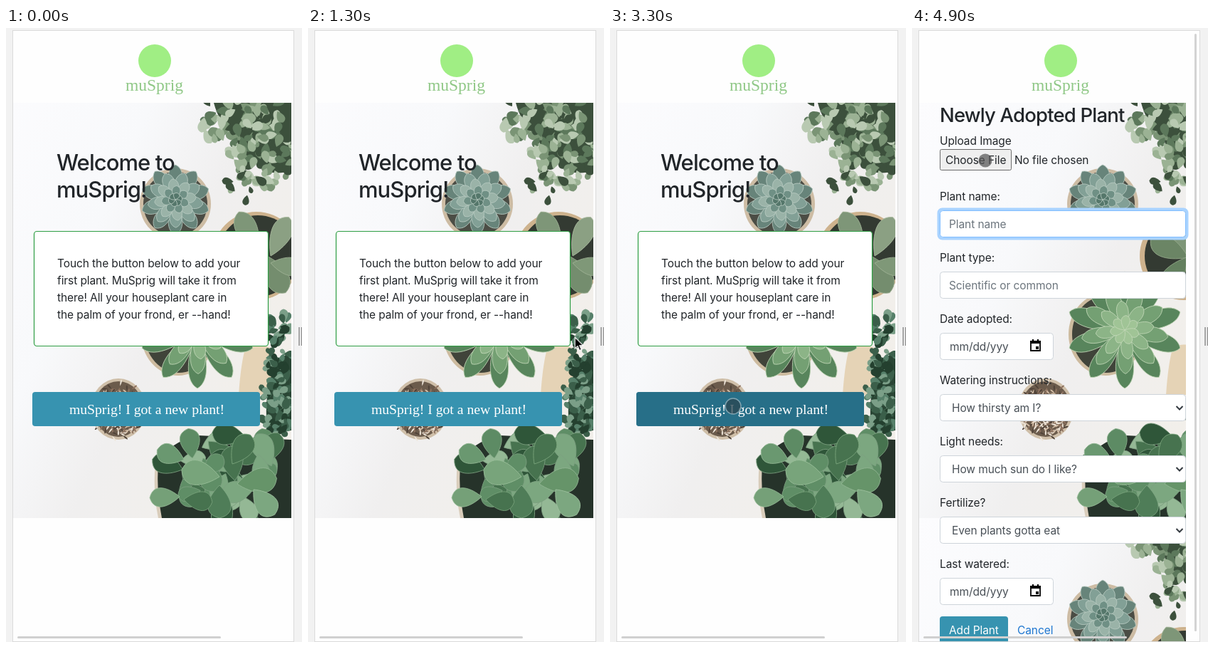
These frames come from a looping animation (416x862 px, 5 s). An HTML page:

```html
<!DOCTYPE html>
<html lang="en">
<head>
<meta charset="utf-8">
<title>Plant care app</title>
<style>
html, body { margin: 0; width: 100%; height: 100%; overflow: hidden; background: #f2f2f2; }
svg { display: block; width: 416px; height: 862px; }
text { font: 15.5px Inter, "Open Sans", sans-serif; letter-spacing: -.09px; fill: #212529; }
.title { font-weight: 500; letter-spacing: -.03em; }
.serif { font-family: "Liberation Serif", serif; letter-spacing: 0; text-anchor: middle; }
.value { fill: #495057; }
.hint { fill: #6c757d; }
.field { fill: #fff; stroke: #ced4da; }
.focus { stroke: #80bdff; }
.glow { fill: none; stroke: #a9d3ff; stroke-width: 4; }

#home, #form, #press, #arrow, #ring, #dot { animation: 5s step-end infinite; }
#home { animation-name: home; }
#form { animation-name: form; }
#press { animation-name: press; }
#arrow { animation-name: arrow; }
#ring { animation-name: ring; }
#dot { animation-name: dot; }
#arrowPath { animation: arrowPath 5s linear infinite; }
#dotPath { animation: dotPath 5s linear infinite; }

@keyframes home { 0% { opacity: 1 } 70%, 100% { opacity: 0 } }
@keyframes form { 0% { opacity: 0 } 70%, 100% { opacity: 1 } }
@keyframes press { 0% { opacity: 0 } 64% { opacity: 1 } 70%, 100% { opacity: 0 } }
@keyframes arrow { 0% { opacity: 0 } 24% { opacity: 1 } 63%, 100% { opacity: 0 } }
@keyframes ring { 0% { opacity: 0 } 63% { opacity: 1 } 70%, 100% { opacity: 0 } }
@keyframes dot { 0% { opacity: 0 } 70%, 100% { opacity: 1 } }
@keyframes arrowPath {
  0%, 24% { transform: translate(404px, 436px) }
  38% { transform: translate(204px, 423px) }
  54%, 100% { transform: translate(173px, 528px) }
}
@keyframes dotPath {
  0%, 72% { transform: translate(173px, 531px) }
  82% { transform: translate(133px, 251px); animation-timing-function: ease-out }
  98%, 100% { transform: translate(103px, 186px) }
}
</style>
</head>
<body>
<svg viewBox="0 0 416 862">
  <defs>
    <linearGradient id="wall" x1="0" y1="0" x2="1" y2=".6">
      <stop offset="0" stop-color="#fcfcfe"/>
      <stop offset=".4" stop-color="#f8f9fb"/>
      <stop offset=".65" stop-color="#f0efef"/>
      <stop offset="1" stop-color="#f2efea"/>
    </linearGradient>
    <clipPath id="tile"><path d="M-30 105H401V688H-30Z"/></clipPath>
    <clipPath id="homeBox"><path d="M10 105H401V688H10Z"/></clipPath>
    <clipPath id="formBox"><path d="M10 105H385V861H10Z"/></clipPath>
    <g id="photo" clip-path="url(#tile)"></g>
  </defs>

  <rect width="416" height="862" fill="#f2f2f2"/>
  <rect x="9.5" y="3.5" width="395" height="858" fill="#fefefe" stroke="#dadada"/>
  <path d="M412 420V446M415.5 420V446" stroke="#8f8f8f" stroke-width="1.5"/>

  <g id="home">
    <g clip-path="url(#homeBox)"><use href="#photo"/></g>
    <text class="title" style="font-size:31px" x="71" y="200">Welcome to</text>
    <text class="title" style="font-size:31px" x="71" y="238">muSprig!</text>
    <rect x="39.5" y="285.5" width="329" height="161" rx="4" fill="#fff" stroke="#2f9e44" stroke-width="1.2"/>
    <text x="72" y="336">Touch the button below to add your</text>
    <text x="72" y="360">first plant. MuSprig will take it from</text>
    <text x="72" y="384">there! All your houseplant care in</text>
    <text x="72" y="408">the palm of your frond, er --hand!</text>
    <rect x="37" y="511" width="320" height="48" rx="4" fill="#3793b0"/>
    <rect id="press" x="37" y="511" width="320" height="48" rx="4" fill="#276f88"/>
    <text class="serif" style="font-size:19.7px;fill:#fff" x="198" y="542">muSprig! I got a new plant!</text>
  </g>

  <g id="form">
    <rect x="10" y="4" width="394" height="857" fill="#fefefe"/>
    <g clip-path="url(#formBox)">
      <use href="#photo" x="30"/>
      <use href="#photo" x="30" y="583"/>
    </g>
    <text class="title" style="font-size:27.5px" x="39" y="132">Newly Adopted Plant</text>
    <g id="fields"></g>
    <path d="M39 861V830q0-4 4-4H131q4 0 4 4V861Z" fill="#3793b0"/>
    <text x="52" y="851" style="fill:#fff">Add Plant</text>
    <text x="148" y="851" style="fill:#1f77d0">Cancel</text>
    <rect x="397" y="8" width="3" height="839" rx="1.5" fill="#d3d3d3"/>
  </g>

  <circle cx="209" cy="46" r="23" fill="#a0ee84"/>
  <text class="serif" style="font-size:23.5px;fill:#8fc886" x="208.5" y="88">muSprig</text>
  <rect x="16" y="854" width="286" height="3" rx="1.5" fill="#d0d0d0"/>

  <g id="arrow"><g id="arrowPath">
    <path d="M0 0V16L3.8 12.6 6.4 18.6 9.2 17.4 6.6 11.6H11.6Z" fill="#000" stroke="#fff" stroke-width="1.2"/>
  </g></g>
  <g id="ring">
    <circle cx="173" cy="531" r="11" fill="#2c4650" fill-opacity=".75" stroke="#7fa3b0" stroke-width="1.5"/>
  </g>
  <g id="dot"><g id="dotPath"><circle r="9.5" fill="#555" fill-opacity=".72"/></g></g>
</svg>

<script>
let seed = 11;
const rand = () => (seed = seed * 16807 % 2147483647) / 2147483647;
const pick = list => list[Math.floor(rand() * list.length)];

const disc = (x, y, rx, ry, fill) =>
  `<ellipse cx="${x}" cy="${y}" rx="${rx}" ry="${ry}" fill="${fill}"/>`;

// A leaf grows from its base towards the given angle, 0 being up.
function leaf(x, y, len, wide, angle, fill, edge = 'none') {
  const d = `M0 0C${wide * .5} ${-len * .3} ${wide} ${-len * .85} 0 ${-len}` +
    `C${-wide} ${-len * .85} ${-wide * .5} ${-len * .3} 0 0`;
  return `<path d="${d}" transform="translate(${x} ${y}) rotate(${angle})" fill="${fill}" stroke="${edge}" stroke-width=".8"/>`;
}

function rosette(x, y, radius, wide, fills, edge) {
  let out = '';
  fills.forEach((fill, ring) => {
    const scale = 1 - ring / fills.length;
    const count = 10 - ring;
    for (let i = 0; i < count; i++)
      out += leaf(x, y, radius * scale, wide * (.3 + .7 * scale), i * 360 / count + ring * 19, fill, edge);
  });
  return out;
}

function clump(x, y, rx, ry, count, len, fills, edge) {
  let out = '';
  for (let i = 0; i < count; i++) {
    const a = rand() * Math.PI * 2, r = Math.sqrt(rand());
    const size = len * (.7 + rand() * .5);
    out += leaf(x + Math.cos(a) * r * rx, y + Math.sin(a) * r * ry, size, size * .55, rand() * 360, pick(fills), edge);
  }
  return out;
}

function spines(x, y, radius, count) {
  let out = '';
  for (let i = 0; i < count; i++) {
    const a = rand() * 360, r = Math.sqrt(rand()) * radius * .95;
    out += leaf(x + Math.cos(a) * r, y + Math.sin(a) * r, 9, 1.8, rand() * 360, pick(['#efe6da', '#d3bda6', '#8f7360', '#4f4238']));
  }
  return out;
}

const sage = ['#3c503c', '#5c785b', '#7a9475', '#9bb294', '#b8c9b1'];
const deep = ['#24402f', '#3b5f4a', '#56806a', '#7b9f88'];
const jade = ['#2f5639', '#47734f', '#5f8e66', '#7ca780', '#94b895'];

document.getElementById('photo').innerHTML = [
  '<rect x="-30" y="105" width="431" height="583" fill="url(#wall)"/>',
  // hanging foliage
  '<path d="M292 105H401V200Q372 210 354 192 328 178 322 150 300 136 292 105Z" fill="#3c503c"/>',
  clump(335, 130, 64, 32, 75, 18, sage),
  clump(358, 178, 44, 45, 70, 18, sage),
  clump(333, 219, 18, 20, 14, 14, sage),
  // grey rosette
  disc(238, 247, 50, 50, '#cdbca4'),
  disc(238, 247, 45, 45, '#4b4d45'),
  rosette(238, 241, 49, 17, ['#67847a', '#82a096', '#9ab3a8', '#6f9085', '#55776b'], '#b9cbc2'),
  // broad leaves at the edge
  disc(352, 320, 62, 62, '#cdb28d'),
  disc(354, 320, 57, 57, '#333a32'),
  leaf(355, 318, 66, 26, -25, '#7e9678', '#a1b396'),
  leaf(358, 322, 58, 26, -65, '#6b8565', '#96aa8b'),
  leaf(372, 320, 60, 25, 25, '#8ba083', '#a9b99e'),
  leaf(362, 318, 62, 28, 150, '#748d6e', '#9aae90'),
  leaf(356, 322, 60, 26, 215, '#64805f', '#93a889'),
  leaf(372, 330, 45, 22, 100, '#7f9878', '#a1b396'),
  // beige pot and trailing stems
  '<path d="M337 447Q355 440 378 452L372 515H327Q330 470 337 447Z" fill="#e5d3b6"/>',
  clump(386, 424, 17, 14, 28, 16, deep),
  '<path d="M382 465Q364 500 366 550 378 568 401 565V455Z" fill="#2a4635"/>',
  clump(381, 468, 18, 14, 26, 14, deep),
  clump(381, 525, 22, 42, 70, 15, deep),
  // green rosette
  disc(242, 430, 52, 58, '#cdbb9f'),
  disc(243, 430, 48, 54, '#40443a'),
  rosette(269, 424, 82, 22, ['#58855c', '#74a073', '#8cb487', '#a0c496'], '#c3d8b8'),
  // cactus
  disc(158, 535, 39, 43, '#cfbfa9'),
  disc(158, 535, 35, 39, '#6b5b4c'),
  spines(159, 538, 38, 220),
  // jade plant
  '<path d="M210 610Q206 650 214 688H250V600Z" fill="#d9cdbb"/>',
  '<path d="M215 608Q232 580 270 572L401 578V688H219Q210 640 215 608Z" fill="#26332a"/>',
  clump(318, 626, 78, 56, 46, 42, jade, '#7da080'),
  leaf(250, 606, 40, 24, -70, '#6a9870', '#94b895'),
  leaf(262, 604, 42, 24, -8, '#5d8b64', '#8bb08c'),
  leaf(300, 630, 54, 30, -80, '#78a47b', '#9abf9a'),
  leaf(318, 612, 48, 26, 32, '#47734f', '#7ba57d'),
  leaf(325, 640, 56, 30, 82, '#669469', '#94b895'),
  leaf(300, 642, 46, 28, 180, '#4f7d58', '#82a984'),
  leaf(244, 658, 42, 23, -92, '#75a078', '#9abf9a'),
  leaf(250, 662, 40, 23, 95, '#47734f', '#7ba57d'),
  leaf(348, 648, 46, 27, 140, '#7ca780', '#a0c2a0')
].join('');

const text = (x, y, body, kind = '') => `<text class="${kind}" x="${x}" y="${y}">${body}</text>`;
const box = (y, width, kind = '') =>
  `<rect class="field ${kind}" x="39.5" y="${y + .5}" width="${width - 1}" height="37" rx="4"/>`;
const input = (y, hint, kind) => box(y, 346, kind) + text(52, y + 25, hint, 'hint');
const select = (y, value) => box(y, 346) + text(56, y + 25, value, 'value') +
  `<path d="M371.5 ${y + 17}l4.5 4.5 4.5-4.5" fill="none" stroke="#343a40" stroke-width="2"/>`;
const date = y => box(y, 160) + text(53, y + 25, 'mm/dd/yyy', 'value') +
  `<path d="M167 ${y + 12}h13v13h-13z" fill="none" stroke="#000" stroke-width="1.8"/>` +
  `<path d="M166 ${y + 11}h15v4h-15zM169 ${y + 9}h2v3h-2zM176 ${y + 9}h2v3h-2zM174 ${y + 19}h4v4h-4z"/>`;

const rows = [
  ['Plant name:', y => '<rect class="glow" x="37.5" y="254.5" width="349" height="41" rx="5"/>' + input(y, 'Plant name', 'focus')],
  ['Plant type:', y => input(y, 'Scientific or common')],
  ['Date adopted:', date],
  ['Watering instructions:', y => select(y, 'How thirsty am I?')],
  ['Light needs:', y => select(y, 'How much sun do I like?')],
  ['Fertilize?', y => select(y, 'Even plants gotta eat')],
  ['Last watered:', date]
];

document.getElementById('fields').innerHTML =
  text(39, 164, 'Upload Image') +
  '<rect x="39.5" y="170.5" width="100" height="29" rx="2" fill="#efefef" stroke="#6b6b6b"/>' +
  text(47, 191, 'Choose File') + text(144, 191, 'No file chosen') +
  rows.map(([label, draw], i) => text(39, 242 + i * 86, label) + draw(256 + i * 86)).join('');
</script>
</body>
</html>
```
